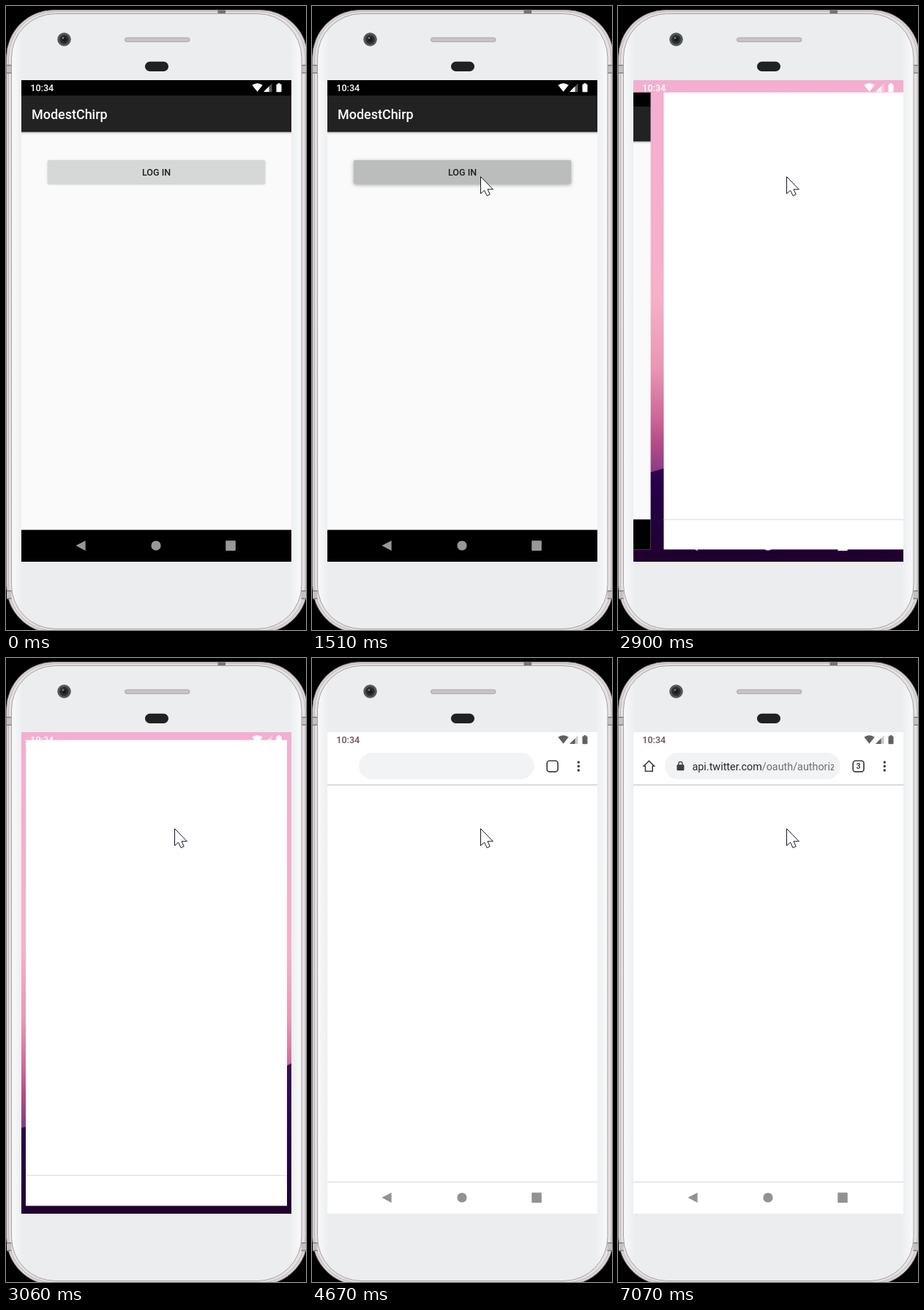
An HTML page with a canvas that plays this animation: 410 px wide and 850 px high, repeating every 8000 ms.

```html
<!DOCTYPE html>
<html lang="en">
<head>
<meta charset="utf-8">
<title>Phone login</title>
<style>
html, body { margin: 0; width: 100%; height: 100%; overflow: hidden; background: #000; }
canvas { display: block; width: 410px; height: 850px; }
</style>
</head>
<body>
<canvas id="stage"></canvas>
<script>
const LOOP = 8000;
const W = 410, H = 850;
const SX = 21, SY = 101, SW = 369, SH = 656;
const CX = SX + SW / 2, CY = SY + SH / 2;
const cv = document.getElementById('stage');
const ctx = cv.getContext('2d');
const dpr = window.devicePixelRatio || 1;
cv.width = W * dpr;
cv.height = H * dpr;

const clamp = x => Math.max(0, Math.min(1, x));
const smooth = x => { x = clamp(x); return x * x * (3 - 2 * x); };
const stepOf = (t, start, end, n) =>
  Math.max(0, Math.min(n - 1, Math.floor((t - start) / ((end - start) / (n - 1)) + 0.02)));

function rect(x, y, w, h, fill) {
  ctx.fillStyle = fill;
  ctx.fillRect(x, y, w, h);
}

function round(x, y, w, h, r, fill, stroke, line = 1) {
  ctx.beginPath();
  ctx.roundRect(x, y, w, h, r);
  paint(fill, stroke, line);
}

function disc(x, y, r, fill, stroke, line) {
  ctx.beginPath();
  ctx.arc(x, y, r, 0, Math.PI * 2);
  paint(fill, stroke, line);
}

function poly(pts, fill, stroke, line) {
  ctx.beginPath();
  pts.forEach(([x, y]) => ctx.lineTo(x, y));
  ctx.closePath();
  paint(fill, stroke, line);
}

function paint(fill, stroke, line = 1) {
  if (fill) { ctx.fillStyle = fill; ctx.fill(); }
  if (stroke) { ctx.strokeStyle = stroke; ctx.lineWidth = line; ctx.stroke(); }
}

function text(str, x, y, size, weight, fill, align = 'left') {
  ctx.font = `${weight} ${size}px Roboto, sans-serif`;
  ctx.textAlign = align;
  ctx.fillStyle = fill;
  ctx.fillText(str, x, y);
}

function gradient(x0, y0, x1, y1, stops) {
  const g = ctx.createLinearGradient(x0, y0, x1, y1);
  stops.forEach(([at, color]) => g.addColorStop(at, color));
  return g;
}

// The right and bottom rims run slightly off the stage.
function drawPhone() {
  rect(0, 0, W, H, '#000');
  round(0.6, 5.5, 411.6, 848.5, 65, '#dcd6d8', '#8e8789', 1);
  round(3.5, 7.7, 405.5, 843.5, 63, '#e6e1e3', '#bdb6b8', 1);
  rect(289.5, 5.5, 10.5, 4.5, '#777274');
  for (const y of [80, 796]) {
    for (const x of [1, 403.5]) {
      rect(x, y, 6.5, 12, '#c4bfc0');
      rect(x, y, 6.5, 1.5, '#858082');
      rect(x, y + 10.5, 6.5, 1.5, '#858082');
    }
  }
  const body = gradient(7, 0, 404, 0, [
    [0, '#f9fafb'], [0.018, '#f3f4f5'], [0.04, '#ebedee'],
    [0.96, '#ebedee'], [0.982, '#f3f4f5'], [1, '#f9fafb']]);
  round(7.5, 10.5, 396.5, 838, 60, body, '#a59fa1', 1);

  disc(79.5, 45.5, 9.3, '#55585a');
  disc(79.5, 45.5, 6.3, '#2c2f32');
  disc(79.5, 45.5, 3, '#16191c');
  disc(78, 43.7, 1.4, '#747b80');
  round(162.5, 43.2, 88.5, 5.5, 2.7, '#c9c3c5', '#aaa3a5', 1);
  round(190, 75.7, 32, 13.3, 6.6, '#212122');
}

function drawWallpaper() {
  rect(SX, SY, SW, SH, gradient(0, SY, 0, 632, [
    [0, '#f3aed1'], [0.56, '#f6b0c9'], [0.74, '#e896b4'],
    [0.87, '#cb6697'], [0.92, '#b84f8a'], [1, '#8c3d83']]));
  poly([[21, 640], [45, 635], [62, 630], [150, 618], [240, 634], [320, 590],
    [390, 552], [390, 757], [21, 757]],
    gradient(0, 560, 0, 757, [[0, '#371058'], [0.5, '#270049'], [1, '#20002d']]));
}

function drawButton(t) {
  const pressed = t >= 1350 && t < 1750;
  const x = 57, y = 210, w = 297, h = 32;
  ctx.save();
  ctx.shadowColor = pressed ? 'rgba(0,0,0,.36)' : 'rgba(0,0,0,.25)';
  ctx.shadowBlur = (pressed ? 5 : 2.5) * dpr;
  ctx.shadowOffsetY = (pressed ? 1.5 : 0.8) * dpr;
  round(x, y, w, h, 1.8, '#d6d7d7');
  ctx.restore();
  if (pressed) {
    ctx.save();
    ctx.beginPath();
    ctx.roundRect(x, y, w, h, 1.8);
    ctx.clip();
    disc(230, 232, [60, 140, 320][stepOf(t, 1350, 1510, 3)], '#bbbdbc');
    ctx.restore();
  }
  text('LOG IN', CX, 231.3, 12.57, 500, '#1e1e1e', 'center');
}

function drawApp(t) {
  rect(SX, SY, SW, SH, '#fafafa');
  rect(SX, 171, SW, 4, gradient(0, 171, 0, 175, [[0, 'rgba(0,0,0,.25)'], [1, 'rgba(0,0,0,0)']]));
  rect(SX, SY, SW, 21.5, '#000');
  rect(SX, 122, SW, 49.6, '#222');
  text('ModestChirp', 35, 154, 17.96, 500, '#fff');
  drawButton(t);
  rect(SX, 713.6, SW, 43.4, '#000');
}

function drawUrl(x) {
  ctx.save();
  ctx.beginPath();
  ctx.rect(x - 1, 132, 296 - x, 30);
  ctx.clip();
  const host = 'api.twitter.com';
  text(host, x, 152.8, 14.37, 400, '#25282b');
  text('/oauth/authorize?oauth_token', x + ctx.measureText(host).width, 152.8, 14.37, 400, '#6b7074');
  ctx.restore();
}

function drawToolbar(t) {
  const ink = '#3c4043';
  ctx.save();
  if (t < 4440) ctx.globalAlpha = 0.5;
  rect(SX, 172, SW, 3, gradient(0, 172, 0, 175, [[0, 'rgba(0,0,0,.2)'], [1, 'rgba(0,0,0,0)']]));
  round(64, 129, 239.5, 36, 18, '#f1f3f4');
  round(321.2, 140, 14.8, 14.8, 3.4, null, ink, 1.7);
  for (const y of [142, 147.5, 153]) disc(364.3, y, 1.75, ink);
  ctx.restore();

  if (t >= 5980) {
    poly([[42.3, 140.2], [35.2, 147.3], [37.4, 147.3], [37.4, 154.2], [47.2, 154.2],
      [47.2, 147.3], [49.4, 147.3]], null, ink, 1.6);
    drawUrl(t < 6290 ? 72.5 : 101.5);
  }
  if (t >= 6290) {
    round(80.4, 145.3, 10, 8, 1.2, ink);
    ctx.beginPath();
    ctx.arc(85.4, 144, 2.6, Math.PI, 0);
    ctx.lineTo(88, 146);
    ctx.moveTo(82.8, 144);
    ctx.lineTo(82.8, 146);
    paint(null, ink, 1.3);
    text('3', 328.5, 151.4, 10.5, 700, ink, 'center');
  }
  if (t >= 6290 && t < 7070) {
    const end = t < 6370 ? 150 : t < 6750 ? 278 : 390;
    ctx.globalAlpha = t < 6990 ? 1 : 0.45;
    rect(SX, 170, SW, 2, '#d2e3fc');
    rect(SX, 170, end - SX, 2, '#1a73e8');
    ctx.globalAlpha = 1;
  }
}

function drawBrowser(t) {
  rect(SX, SY, SW, SH, '#fff');
  rect(SX, 713, SW, 1.6, '#e4e4e4');
  if (t >= 4360) drawToolbar(t);
}

function drawStatus(dark) {
  const ink = dark ? '#665d63' : '#fff';
  text('10:34', 33.3, 116.4, 12.57, 500, dark ? '#704f60' : '#fff');
  ctx.beginPath();
  ctx.moveTo(343.5, 116.8);
  ctx.lineTo(336.3, 107.8);
  ctx.quadraticCurveTo(343.5, 102.6, 350.7, 107.8);
  ctx.closePath();
  paint(ink);
  ctx.globalAlpha = 0.35;
  poly([[352, 117], [363.5, 117], [363.5, 105.4]], ink);
  ctx.globalAlpha = 1;
  poly([[352, 117], [359.5, 117], [359.5, 109.4]], ink);
  round(369.5, 106.5, 7, 10.7, 1, ink);
  rect(371.5, 105.2, 3, 2, ink);
}

function drawNav(fill) {
  poly([[95.4, 735], [108.6, 728.3], [108.6, 742]], fill);
  disc(205, 735, 6.6, fill);
  round(300.2, 728.3, 13.6, 13.6, 0.8, fill);
}

function navColor(t) {
  if (t < 2740) return '#989898';
  if (t < 3510) return '#fff';
  if (t >= 4130) return '#929292';
  const v = Math.round(255 - 153 * (stepOf(t, 3510, 3740, 4) + 1) / 4);
  return `rgb(${v},${v},${v})`;
}

function drawWindow(draw, t, scale, shift) {
  ctx.save();
  ctx.translate(CX, CY);
  ctx.scale(scale, scale);
  ctx.translate(shift * SW * 1.05 - CX, -CY);
  ctx.beginPath();
  ctx.rect(SX, SY, SW, SH);
  ctx.clip();
  draw(t);
  ctx.restore();
}

// Both windows shrink, slide left together, then grow back.
function drawSwitch(t) {
  const at = 30 + stepOf(t, 2670, 3280, 9) * 76.4;
  const scale = 1 - 0.05 * smooth(at / 133) + 0.05 * smooth((at - 283) / 317);
  const slide = 1 - Math.pow(1 - Math.pow(clamp((at - 50) / 383), 1.5), 4.72);
  drawWallpaper();
  drawWindow(drawApp, t, at < 40 ? 0.997 : scale, -slide);
  if (slide > 0) drawWindow(drawBrowser, t, scale, 1 - slide);
}

function drawCursor(t) {
  if (t < 340) return;
  const k = stepOf(t, 340, 1030, 10);
  const up = smooth(k / 5), back = smooth((k - 5) / 4);
  ctx.save();
  ctx.translate(241 - 20 * up + 9 * back, 431 - 311 * up + 112 * back);
  poly([[0.5, 0.5], [0.5, 23.6], [5.6, 19.2], [9.1, 26.5], [13.2, 24.6], [10, 17.8], [17.4, 17.8]],
    '#fff', '#15152a', 1);
  ctx.restore();
  if (t >= 1200 && t < 1510) disc(230, 232, 18, 'rgba(255,255,0,.47)');
}

function render(t) {
  ctx.setTransform(dpr, 0, 0, dpr, 0, 0);
  drawPhone();
  ctx.save();
  ctx.beginPath();
  ctx.rect(SX, SY, SW, SH);
  ctx.clip();
  if (t < 2670) drawApp(t);
  else if (t < 3280) drawSwitch(t);
  else drawBrowser(t);
  drawStatus(t >= 3125);
  drawNav(navColor(t));
  ctx.restore();
  drawCursor(t);
}

const begin = performance.now();
function tick() {
  render((performance.now() - begin) % LOOP);
  requestAnimationFrame(tick);
}
tick();
</script>
</body>
</html>
```
